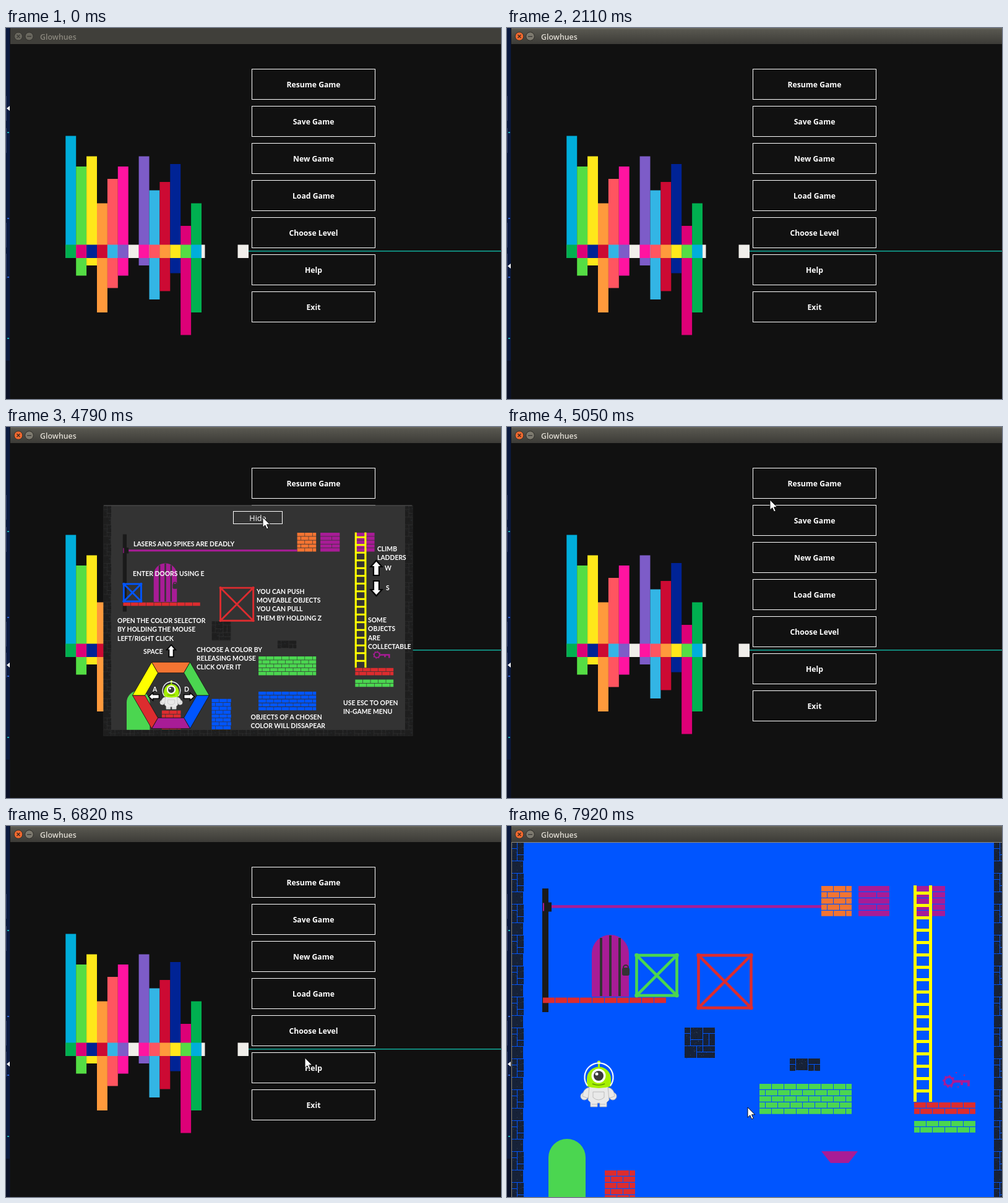
Write an HTML page that moves like this. It is 800 px wide and 600 px high and loops after 8000 ms.

```html
<!DOCTYPE html>
<html>
<head>
<meta charset="utf-8">
<style>
html, body { margin: 0; width: 100%; height: 100%; overflow: hidden; background: #111; }
svg { display: block; width: 800px; height: 600px; }
text { fill: #fff; }
.ui { font: 700 12.2px "Open Sans", "Noto Sans", sans-serif; text-anchor: middle; }
.hide { font-weight: 400; font-size: 12.6px; }
.title { font: 600 12.4px "Open Sans", "Noto Sans", sans-serif; }
.tip { font: 700 10.4px Lato, "Open Sans", sans-serif; }
</style>
</head>
<body>
<svg id="stage" viewBox="0 0 800 600"></svg>
<script>
const LOOP = 8000;
const RED = '#dc2c2f', GREEN = '#4bd650', BLUE = '#0055ff', PURPLE = '#a81c96', ORANGE = '#f37432',
  YELLOW = '#ffff00', DARK = '#1a1a1a';

const rect = (x, y, w, h, fill, more = '') =>
  `<rect x="${x}" y="${y}" width="${w}" height="${h}" fill="${fill}" ${more}/>`;
const path = (d, fill, more = '') => `<path d="${d}" fill="${fill}" ${more}/>`;
const circle = (x, y, r, fill, more = '') => `<circle cx="${x}" cy="${y}" r="${r}" fill="${fill}" ${more}/>`;
const text = (x, y, cls, s) => `<text x="${x}" y="${y}" class="${cls}">${s}</text>`;
const group = (id, body, more = '') => `<g id="${id}" ${more}>${body}</g>`;
const at = (x, y, body, more = '') => `<g transform="translate(${x} ${y}) ${more}">${body}</g>`;

// Rows of bricks with open joints
function bricks(x, y, w, h, color, brickW = 20) {
  let d = '';
  for (let row = 0; row * 10 < h; row++) {
    for (let bx = row % 2 ? -brickW / 2 : 0; bx < w; bx += brickW) {
      const a = Math.max(0, bx), b = Math.min(w, bx + brickW - 1);
      if (b > a) d += `M${x + a} ${y + row * 10}h${b - a}v8.7h${a - b}z`;
    }
  }
  return path(d, color);
}

function crate(size, color) {
  const a = 2.5, b = size - 2.5;
  const corners = [[a, a], [a, b], [b, a], [b, b]].map(([x, y]) => circle(x, y, 3.3, color)).join('');
  return path(`M${a} ${a}H${b}V${b}H${a}ZL${b} ${b}M${b} ${a}L${a} ${b}`, 'none',
    `stroke="${color}" stroke-width="4.6"`) + corners;
}

function ladder(x, y, h) {
  let d = `M${x} ${y}h5v${h}h-5zM${x + 25} ${y}h5v${h}h-5z`;
  for (let ry = 10; ry < h; ry += 20) d += `M${x} ${y + ry}h30v5h-30z`;
  return path(d, YELLOW);
}

const arch = (x, y, w, h) => `M${x} ${y + h}V${y + w / 2}a${w / 2} ${w / 2} 0 0 1 ${w} 0V${y + h}z`;

const emitter = rect(59, -7, 13, 15, DARK) + rect(58, -6, 2, 13, PURPLE);

const alien = (() => {
  const edge = 'stroke="#bcbcbc" stroke-width="1"', suit = '#e9e9e9';
  return circle(6, 60, 6, suit, edge) + circle(52, 60, 6, suit, edge) +
    path('M13 46Q4 48 3 60l8 3 6-8zM45 46q9 2 10 14l-8 3-6-8z', suit, edge) +
    path('M14 44H44L46 66 42 70V77H31V71H27V77H16V70L12 66Z', suit, edge) +
    path('M20 53H38V62q-9 8-18 0zM18 73h9M31 73h9', 'none', edge) +
    path('M10 44V32a19.5 19.5 0 0 1 39 0V44Q29 50 10 44z', '#a6f000') +
    path('M29.5 14V5', 'none', 'stroke="#a6f000" stroke-width="3"') + circle(29.5, 5, 2.6, '#c8f52a') +
    path('M11 43a23 23 0 1 1 37 0', 'none', 'stroke="#f2f8ff" stroke-width="2.2"') +
    circle(29, 27, 11.5, '#fff') + circle(29, 27, 8, '#3a3a3a') + circle(26, 24, 2.5, '#fff') +
    path('M19 40q10 4 20 0', 'none', 'stroke="#5c9a00" stroke-width="1.6"');
})();

const key = circle(714, 413, 7, 'none', `stroke="${PURPLE}" stroke-width="3"`) +
  circle(714, 413, 9, 'none', `stroke="${PURPLE}" stroke-width="2" stroke-dasharray="3 4"`) +
  path('M722 411h26v10h-4v-6h-7v4h-4v-4h-11z', PURPLE);

const stone = (x, y, w, h) => at(x, y, rect(0, 0, w, h, 'url(#stone)'));

function stonePattern() {
  const blocks = [[0, 0, 9, 9], [10, 0, 19, 19], [30, 0, 19, 9], [0, 10, 9, 19], [30, 10, 9, 19], [40, 10, 9, 19],
    [10, 20, 19, 9], [0, 30, 19, 19], [20, 30, 9, 9], [30, 30, 19, 9], [20, 40, 29, 9]];
  let body = blocks.map(b => rect(...b, DARK, 'opacity=".87"')).join(''), seed = 7;
  const rnd = n => (seed = seed * 16807 % 2147483647) % n;
  for (let i = 0; i < 90; i++) body += rect(rnd(50), rnd(50), 1, 1, i % 2 ? '#000' : '#5a7890', 'opacity=".35"');
  return `<pattern id="stone" width="50" height="50" patternUnits="userSpaceOnUse">${body}</pattern>`;
}

// The level, shared by the game and the scaled help panel
const level =
  stone(7, 27, 20, 596) + stone(787, 27, 20, 596) + stone(27, 607, 760, 16) +
  stone(287, 326, 50, 50) + stone(457, 376, 50, 20) +
  rect(57, 101, 10, 200, DARK) +
  path(arch(137, 176, 60, 100), PURPLE) +
  [150, 165, 180].map(x => rect(x, x === 165 ? 177 : 181, 4, x === 165 ? 98 : 94, '#333')).join('') +
  rect(186, 229, 12, 13, '#333', 'rx="3"') +
  path('M188 231v-2a4 4 0 0 1 8 0v2', 'none', 'stroke="#333" stroke-width="2"') +
  bricks(58, 277.5, 199, 9, RED) +
  bricks(508, 97, 49, 49, ORANGE) + bricks(568, 97, 50, 49, PURPLE, 60) + bricks(658, 97, 50, 49, PURPLE, 60) +
  ladder(657, 96, 350) + key +
  bricks(408, 417, 149, 49, GREEN) + bricks(408, 508, 149, 49, BLUE) + bricks(287, 527, 50, 80, BLUE) +
  bricks(658, 447, 99, 19, RED) + bricks(658, 477, 99, 19, GREEN) +
  path(arch(67, 506, 60, 101), GREEN) + bricks(158, 557, 49, 50, RED);

function bars() {
  const colors = ['#00aedb', '#55dd44', '#ffe81a', '#ff9a3c', '#ff5560', '#ff14a0',
    '#7d5cc8', '#33b5e5', '#cc0a33', '#002395', '#dd0077', '#00b050'];
  const tops = [174.5, 224, 207.5, 283.5, 244, 224, 207.5, 262.5, 249, 220, 320, 283.5];
  let out = rect(96.5, 350.5, 225, 21.5, '#f0eeea') + rect(374.5, 350.5, 17.5, 21.5, '#f0eeea') +
    rect(392, 360, 408, 1.6, '#12a594');
  tops.forEach((y, i) => {
    const x = 96.3 + 16.9 * (i + (i > 5));
    out += rect(x, y, 16.9, 176.5, colors[i]) + rect(x, 350.5, 16.9, 21.5, colors[11 - i]);
  });
  return out;
}

const buttons = ['Resume Game', 'Save Game', 'New Game', 'Load Game', 'Choose Level', 'Help', 'Exit']
  .map((s, i) => rect(397.5, 66.5 + 60 * i, 199, 49, '#111', 'stroke="#fff"') + text(497, 95.7 + 60 * i, 'ui', s)).join('');

function wheel() {
  const point = (r, k) => [266.5 + r * Math.cos(k * Math.PI / 3), 434 + r * Math.sin(k * Math.PI / 3)];
  return [BLUE, PURPLE, RED, YELLOW, ORANGE, GREEN].map((c, k) =>
    path('M' + [point(62, k), point(62, k + 1), point(42, k + 1), point(42, k)].join('L') + 'Z', c,
      'stroke="#111" stroke-width=".8"')).join('');
}

const arrow = (x, y, turn, size) => at(x, y, path('M0-12L9-2H4.5V12H-4.5V-2H-9Z', '#fff',
  'stroke="#000" stroke-width="2.2"'), `rotate(${turn}) scale(${size})`);

function help() {
  const tips = [
    [206, 193, 'LASERS AND SPIKES ARE DEADLY'], [205, 241, 'ENTER DOORS USING E'],
    [180, 317, 'OPEN THE COLOR SELECTOR|BY HOLDING THE MOUSE|LEFT/RIGHT CLICK'],
    [405, 269.5, 'YOU CAN PUSH|MOVEABLE OBJECTS|YOU CAN PULL|THEM BY HOLDING Z'],
    [308, 363.5, 'CHOOSE A COLOR BY|RELEASING MOUSE|CLICK OVER IT'],
    [395.5, 473, 'OBJECTS OF A CHOSEN|COLOR WILL DISSAPEAR'],
    [545, 450, 'USE ESC TO OPEN|IN-GAME MENU'], [600, 200.5, 'CLIMB|LADDERS'],
    [585, 316, 'SOME|OBJECTS|ARE|COLLECTABLE'], [222, 366.5, 'SPACE'],
    [237, 427.5, 'A'], [288, 427.5, 'D'], [612, 232, 'W'], [614, 264, 'S']];
  const map = rect(7, 26, 800, 597, '#333') + level +
    rect(72, 140.5, 436, 5, PURPLE) + at(0, 142.5, emitter) +
    at(57, 227, crate(50, BLUE)) + at(307, 237, crate(90, RED));
  return at(153.1, 110.4, map, 'scale(.625)') + rect(158, 126.5, 498, 1, '#555') + wheel() +
    at(248.9, 408, alien, 'scale(.625)') +
    arrow(598.5, 228, 0, 1) + arrow(598.5, 261, 180, 1) + arrow(267, 362, 0, .8) +
    arrow(239, 436, -90, .7) + arrow(296, 436, 90, .7) +
    rect(367.5, 136.5, 79, 20, '#333', 'stroke="#fff"') + text(407, 151.7, 'ui hide', 'Hide') +
    tips.map(([x, y, s]) => s.split('|').map((line, i) => text(x, y + i * 14.4, 'tip', line)).join('')).join('');
}

const game = rect(7, 26, 793, 574, BLUE) + level +
  rect(7, 26, 793, 1, '#8d8a7e') + rect(7, 26, 1, 574, '#8d8a7e') +
  path('M508 526h59l-15 19h-29z', PURPLE) +
  group('sparks', [[725, 398], [738, 402], [717, 421], [728, 421]].map(p => rect(...p, 2, 2, PURPLE)).join('')) +
  group('laser', rect(72, -2.5, 1, 4.6, PURPLE, 'id="beam"') + emitter) +
  group('crates', at(207, 0, crate(70, GREEN)) + at(307, 0, crate(90, RED))) +
  group('hero', alien);

const desktop = rect(0, 0, 7, 600, '#0b1a40') + rect(0, 538, 7, 62, '#0a1128') + rect(6, 0, 1, 600, '#10131c') +
  [110, 162, 315, 365].map(y => rect(0, y, 1, 40, '#34406a')).join('') +
  [[168, '#16a9b0'], [307, '#2c5fd0'], [402, '#2c5fd0'], [501, '#16a9b0']].map(([y, c]) => rect(2, y, 3, 2, c)).join('') +
  group('marker', path('M1 0l5-4v8z', '#fff'));

const titleBar = rect(7, 0, 793, 26, 'url(#bar)') +
  group('titleOn', rect(7, 0, 793, 2, '#65635a') + circle(20, 13.5, 6.8, '#f0692f', 'stroke="#2e2d29"') +
    path('M17.5 11l5 5m0-5l-5 5', 'none', 'stroke="#3c2a20" stroke-width="1.4"') +
    group('minButton', circle(37.5, 13.5, 6.8, '#7d7a6f', 'stroke="#2e2d29"') + rect(34, 13, 7, 1.4, '#3c3b37')) +
    `<text x="55" y="18.5" class="title" style="fill:#dfdbd2">Glowhues</text>`) +
  group('titleOff', rect(7, 0, 793, 26, '#403f3a') +
    circle(20, 13.5, 6.5, '#6a685f', 'stroke="#34332f"') + circle(37.5, 13.5, 6.5, '#6a685f', 'stroke="#34332f"') +
    path('M17.5 11l5 5m0-5l-5 5M34 13.5h7', 'none', 'stroke="#3c3b37" stroke-width="1.4"') +
    `<text x="55" y="18.5" class="title" style="fill:#8a877d">Glowhues</text>`) +
  group('smear', rect(50, 5, 72, 11.5, '#4a4943') + rect(34, 18, 7, 1.2, '#8a877d') +
    '<ellipse cx="86" cy="13.5" rx="24" ry="3.8" fill="#6d6b60" stroke="#2e2d29"/>');

const stage = document.getElementById('stage');
stage.innerHTML = `<defs>${stonePattern()}<linearGradient id="bar" x2="0" y2="1">
  <stop stop-color="#5b5a52"/><stop offset="1" stop-color="#3c3b37"/></linearGradient></defs>` +
  rect(0, 0, 800, 600, '#111') + desktop + group('menu', bars() + buttons) + group('help', help()) +
  group('game', game) + titleBar +
  group('pointer', path('M0 0V16.3L3.8 12.8 6.5 19 9.2 17.8 6.5 11.8H11.7Z', '#fff', 'stroke="#000" stroke-width=".9"'));

const $ = id => document.getElementById(id);
const show = (id, on) => $(id).setAttribute('display', on ? 'inline' : 'none');
const move = (id, x, y) => $(id).setAttribute('transform', `translate(${x} ${y})`);
const clamp = v => Math.min(1, Math.max(0, v));

const pointerPath = [[250, 800, 480], [1010, 716, 331], [1160, 716, 331], [1400, 656, 150], [1620, 664, 18],
  [1920, 664, 18], [2110, 800, 106], [2500, 705, 263], [2970, 541, 391], [3460, 541, 391], [4220, 548, 233],
  [4510, 415, 146], [4850, 415, 146], [5150, 430, 104], [5560, 517, 303], [5740, 502, 337], [5890, 502, 337],
  [5990, 500, 333.5], [6450, 500, 333.5], [7020, 474, 397], [7280, 474, 397], [7920, 389, 455]];

function pointerAt(t) {
  const i = pointerPath.findIndex(p => p[0] > t);
  if (i < 1) return pointerPath.at(-1).slice(1);
  const [t0, x0, y0] = pointerPath[i - 1], [t1, x1, y1] = pointerPath[i];
  const p = (t - t0) / (t1 - t0);
  return [x0 + (x1 - x0) * p, y0 + (y1 - y0) * p];
}

function draw(t) {
  const active = t >= 250, playing = t >= 7020, smeared = t >= 7160 && t < 7400;
  show('titleOn', active);
  show('titleOff', !active);
  show('smear', smeared);
  show('minButton', !smeared);
  move('marker', 0, active ? 385 : 130);
  show('menu', !playing);
  show('help', t >= 3460 && t < 4850);
  show('game', playing);
  show('pointer', active && !(t >= 2110 && t < 2500));
  move('pointer', ...pointerAt(t));
  if (!playing) return;

  const fall = Math.max(0, Math.min(t, 7920) - 7116) / 1000;
  const crateY = 87 + 185 * fall * fall;
  const laserY = 119.5 + 11 * (Math.min(t, 7920) - 7280) / 640;
  const jump = clamp((t - 7400) / 520);
  move('crates', 0, crateY);
  move('laser', 0, laserY);
  $('beam').setAttribute('width', (crateY < laserY ? 207 : 508) - 72);
  move('hero', 68 + 51 * jump, 527 - 150 * (1 - (1 - jump) ** 2));
  show('sparks', t >= 7400);
}

function tick() {
  draw(performance.now() % LOOP);
  requestAnimationFrame(tick);
}
tick();
</script>
</body>
</html>
```
